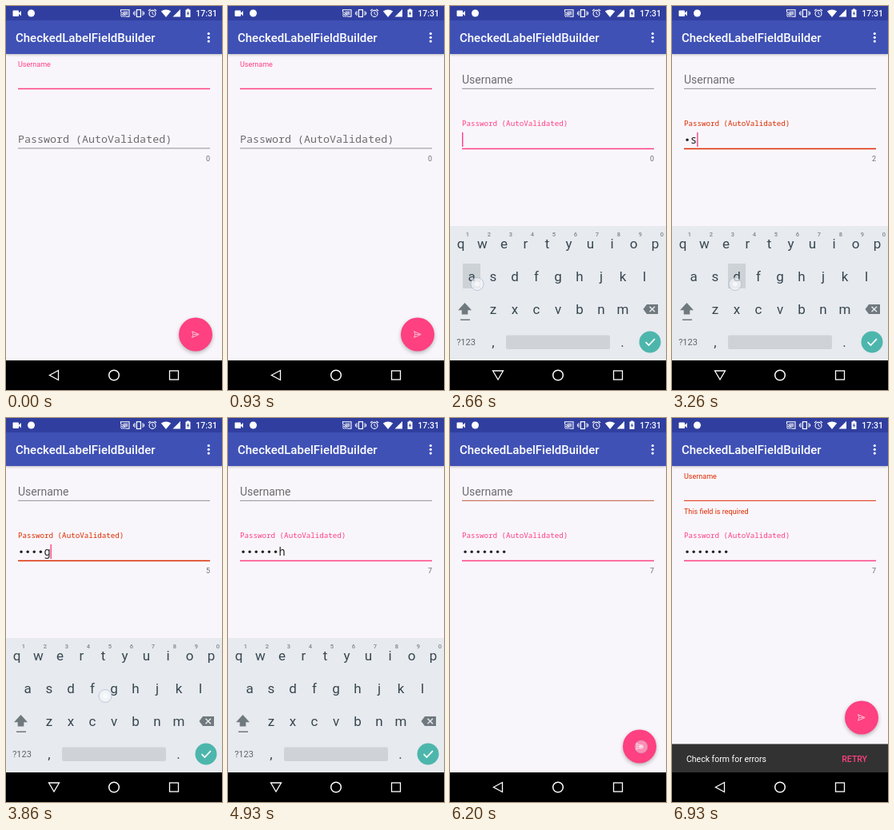
Animation of 270 by 480 pixels, one loop 7120 ms. Source, as an HTML page with a canvas:

```html
<!DOCTYPE html>
<html lang="en">
<head>
<meta charset="utf-8">
<title>Form validation</title>
<style>
  html, body { margin: 0; width: 100%; height: 100%; overflow: hidden; background: #000; }
  canvas { display: block; width: 270px; height: 480px; }
</style>
</head>
<body>
<canvas id="stage"></canvas>
<script>
const LOOP = 7120;
const SANS = 'Roboto, sans-serif';
const MONO = '"Noto Sans Mono", monospace';
const PINK = [255, 64, 129], RED = [221, 44, 0], GREY = [110, 108, 112], RULE = [146, 144, 147];
const ADVANCE = 8.1;
const NAV_TOP = 443;
const BLINKS = [[400, 930], [1330, 1860], [2330, 4930], [5430, 5930], [6430, 6930]];
const KEY_ROWS = [['qwertyuiop', 13.5, 297], ['asdfghjkl', 27, 338], ['zxcvbnm', 54, 379]];
// [press time, key, key centre]
const TAPS = [[2660, 'a', 27], [2900, 's', 54], [3180, 'd', 81], [3460, 'f', 108],
  [3730, 'g', 135], [4040, 'h', 162], [4300, 'h', 162]];
const HOLD = 130;

const canvas = document.getElementById('stage');
const ctx = canvas.getContext('2d');
const dpr = window.devicePixelRatio || 1;
canvas.width = 270 * dpr;
canvas.height = 480 * dpr;

const clamp = x => Math.min(1, Math.max(0, x));
const ramp = (t, from, ms) => clamp((t - from) / ms);
const lerp = (a, b, k) => a + (b - a) * k;
const mix = (a, b, k) => a.map((v, i) => Math.round(lerp(v, b[i], k)));
const rgb = c => `rgb(${c.join()})`;
const easeOut = (x, n = 2) => 1 - Math.pow(1 - x, n);
const easeInOut = x => x * x * (3 - 2 * x);

function rect(x, y, w, h, color) {
  ctx.fillStyle = color;
  ctx.fillRect(x, y, w, h);
}

function disc(x, y, r, color) {
  ctx.fillStyle = color;
  ctx.beginPath();
  ctx.arc(x, y, r, 0, Math.PI * 2);
  ctx.fill();
}

function ring(x, y, r, color, width = 1.2, from = 0, to = Math.PI * 2) {
  ctx.strokeStyle = color;
  ctx.lineWidth = width;
  ctx.beginPath();
  ctx.arc(x, y, r, from, to);
  ctx.stroke();
}

function poly(points, fill, stroke, width = 1.2) {
  ctx.beginPath();
  points.forEach(([x, y], i) => i ? ctx.lineTo(x, y) : ctx.moveTo(x, y));
  ctx.closePath();
  if (fill) { ctx.fillStyle = fill; ctx.fill(); }
  if (stroke) { ctx.strokeStyle = stroke; ctx.lineWidth = width; ctx.stroke(); }
}

function line(points, color, width) {
  ctx.strokeStyle = color;
  ctx.lineWidth = width;
  ctx.beginPath();
  points.forEach(([x, y], i) => i ? ctx.lineTo(x, y) : ctx.moveTo(x, y));
  ctx.stroke();
}

function rounded(x, y, w, h, r, color) {
  ctx.fillStyle = color;
  ctx.beginPath();
  ctx.roundRect(x, y, w, h, r);
  ctx.fill();
}

function text(str, x, y, size, color, { font = SANS, weight = 400, align = 'left' } = {}) {
  ctx.font = `${weight} ${size}px ${font}`;
  ctx.textAlign = align;
  ctx.fillStyle = color;
  ctx.fillText(str, x, y);
}

function withAlpha(alpha, draw) {
  ctx.save();
  ctx.globalAlpha *= alpha;
  draw();
  ctx.restore();
}

function withShadow(color, blur, dy, draw) {
  ctx.save();
  ctx.shadowColor = color;
  ctx.shadowBlur = blur * dpr;
  ctx.shadowOffsetY = dy * dpr;
  draw();
  ctx.restore();
}

function drawBars() {
  withShadow('rgba(0,0,0,.25)', 3, 1, () => rect(0, 18, 270, 42, '#3f51b5'));
  rect(0, 0, 270, 18, '#303f9f');
  text('CheckedLabelFieldBuilder', 12, 45, 15, '#fff', { weight: 500 });
  for (const y of [34.5, 39.3, 44.1]) disc(253.3, y, 1.6, '#fff');
  drawStatusIcons();
}

function drawStatusIcons() {
  const white = '#fff';
  rounded(8.5, 5.5, 7.5, 7.5, 1, white);
  poly([[15.5, 9.2], [18.8, 6], [18.8, 12.6]], white);
  disc(31.5, 9, 4.5, white);

  line([[143.5, 7], [143.5, 4.8], [154, 4.8], [154, 13.2], [150, 13.2]], white, 1.1);
  for (const r of [2, 4, 6]) ring(143, 13.8, r, white, 1, -Math.PI / 2, 0);
  rect(146.5, 6.5, 5.8, 4.8, 'rgba(255,255,255,.6)');

  ctx.strokeStyle = white;
  ctx.lineWidth = 1.2;
  ctx.strokeRect(163.4, 4.7, 5, 8.8);
  for (const x of [161, 171]) line([[x, 6.2], [x, 12]], white, 1);
  for (const x of [159.4, 172.6]) line([[x, 7.5], [x, 10.7]], white, 1);

  ring(183, 9.4, 4, white, 1.1);
  line([[183, 7], [183, 9.7], [184.8, 10.7]], white, 0.9);
  line([[178, 6], [180.6, 3.9]], white, 1.1);
  line([[188, 6], [185.4, 3.9]], white, 1.1);

  ctx.fillStyle = white;
  ctx.beginPath();
  ctx.moveTo(200, 14);
  ctx.lineTo(193.8, 6.6);
  ctx.quadraticCurveTo(200, 2.2, 206.2, 6.6);
  ctx.fill();
  poly([[208.5, 13.6], [218, 13.6], [218, 4]], white);

  rounded(224.5, 4.6, 6, 9.4, 0.6, white);
  rect(226.2, 3.5, 2.6, 1.4, white);
  poly([[228, 6], [225.9, 9.7], [227.3, 9.7], [227, 12.6], [229.2, 8.8], [227.8, 8.8]], '#303f9f');
  text('17:31', 264, 13, 10.5, white, { weight: 500, align: 'right' });
}

function cursor(t, x, y) {
  if (BLINKS.some(([a, b]) => t >= a && t < b)) rect(x, y, 1.4, 18, rgb(PINK));
}

function drawUsername(t) {
  const focused = t < 1330;
  const down = ramp(t, 1330, 200);
  const up = easeInOut(ramp(t, 6210, 200));
  const error = ramp(t, 6140, 110);
  const rested = t < 6200;
  const size = rested ? lerp(9, 14, Math.pow(down, 1.6)) : lerp(14, 9, up);
  const y = rested ? lerp(75.5, 96.6, easeOut(down, 2.2)) : lerp(96.6, 75.5, up);
  const color = rested ? mix(PINK, GREY, ramp(t, 1330, 120)) : mix(GREY, RED, up);
  text('Username', 15, y, size, rgb(color));
  if (focused) {
    rect(15, 102.7, 240, 1.5, rgb(PINK));
    cursor(t, 15, 83);
  } else {
    rect(15, 102.8, 240, 1, rgb(mix(RULE, RED, error)));
  }
  withAlpha(ramp(t, 6260, 200), () => text('This field is required', 15, 119.5, 9, rgb(RED)));
}

function drawPassword(t) {
  const count = TAPS.filter(([at]) => t >= at + HOLD).length;
  const focused = t >= 1330;
  const k = ramp(t, 1330, 200);
  const accent = count > 0 && count < 6 ? RED : PINK;
  const size = lerp(13.35, 9.2, easeOut(k, 1.5));
  const y = lerp(171.3, 150.2, Math.pow(k, 3.7));
  const color = mix(GREY, accent, Math.pow(k, 1.5));
  text('Password (AutoValidated)', 15, y, size, rgb(color), { font: MONO });

  if (focused) rect(15, 177.7, 240, 1.5, rgb(accent));
  else rect(15, 177.4, 240, 1, rgb(RULE));
  text(String(count), 255, 194, 9, rgb(GREY), { align: 'right' });

  const revealed = count > 0 && t < 5930;
  const dots = revealed ? count - 1 : count;
  for (let i = 0; i < dots; i++) disc(15 + (i + 0.5) * ADVANCE, 167.3, 1.7, '#222');
  if (revealed) text(TAPS[count - 1][1], 15 + dots * ADVANCE, 172.3, 13.5, '#222', { font: MONO });
  if (focused) cursor(t, 15 + count * ADVANCE, 158);
}

function drawFab(rise) {
  const y = 410.5 - rise;
  const ink = '#f8c4d5';
  withShadow('rgba(0,0,0,.28)', 5, 2, () => disc(237, y, 21, rgb(PINK)));
  poly([[232.6, y - 3.8], [241.2, y], [232.6, y + 3.8], [234, y]], null, ink, 1);
  line([[234, y], [239, y]], ink, 0.9);
}

function drawSnackbar(t, k) {
  if (!k) return;
  ctx.save();
  ctx.translate(0, 36.5 * (1 - k));
  rect(0, 407.5, 270, 37, '#323232');
  withAlpha(ramp(t, 6330, 180), () => {
    text('Check form for errors', 18, 429.5, 10.5, '#fff');
    text('RETRY', 244, 429.5, 10.5, rgb(PINK), { weight: 500, align: 'right' });
  });
  ctx.restore();
}

function drawKeyboard(t) {
  const ink = '#37474f', soft = '#7d878c', back = '#e7eaef';
  const center = { align: 'center' };
  rect(0, 275, 270, NAV_TOP - 275, back);
  const pressed = TAPS.find(([at]) => t >= at && t < at + HOLD - 20);
  if (pressed) rect(pressed[2] - 11, 322, 22, 31, '#cdd2d6');

  for (const [keys, x, y] of KEY_ROWS) {
    [...keys].forEach((key, i) => text(key, x + i * 27, y + 5.5, 17, ink, center));
  }
  for (let i = 0; i < 10; i++) text(String((i + 1) % 10), 22 + i * 27, 288, 7.5, soft, { align: 'center', weight: 500 });

  poly([[18.5, 371], [27, 380.3], [22.3, 380.3], [22.3, 385.5], [14.7, 385.5], [14.7, 380.3], [10, 380.3]], '#6f797e');
  rect(13, 391.5, 12, 1.5, '#6f797e');
  poly([[241.5, 379], [246, 373], [260, 373], [260, 385], [246, 385]], '#6f797e');
  line([[249.5, 375.8], [256, 382.2]], back, 1.5);
  line([[256, 375.8], [249.5, 382.2]], back, 1.5);

  text('?123', 20, 424, 11, '#5d686e', center);
  text(',', 54, 425.5, 17, ink, center);
  text('.', 215.5, 425.5, 17, ink, center);
  rounded(70, 411.5, 130, 17.5, 2, '#cfd3d7');
  disc(250, 420, 13.5, '#4db6ac');
  line([[244.6, 420.2], [248.4, 424], [256, 416.2]], '#fff', 1.7);
}

function drawNavIcons(keyboardOpen) {
  const back = keyboardOpen
    ? [[53.5, 456], [66.5, 456], [60, 467]]
    : [[54.4, 461.5], [65.5, 455.5], [65.5, 467.5]];
  poly(back, null, '#fff', 1.3);
  ring(135, 461.5, 6.3, '#fff', 1.5);
  ctx.strokeStyle = '#fff';
  ctx.lineWidth = 1.3;
  ctx.strokeRect(204.5, 456, 11, 11);
}

function drawTouch(t, start, hold, x, y) {
  if (t < start) return;
  const alpha = 1 - ramp(t, start + hold, 60);
  if (!alpha) return;
  withAlpha(alpha, () => {
    disc(x, y, 8, 'rgba(245,248,252,.65)');
    ring(x, y, 8, 'rgba(150,165,190,.6)', 0.9);
    disc(x, y, 3, 'rgba(255,255,255,.6)');
  });
}

function drawNav(t) {
  const shown = easeOut(ramp(t, 1370, 207));
  const hidden = Math.pow(ramp(t, 5550, 170), 2);
  const alpha = shown - hidden;
  rect(0, NAV_TOP, 270, 480 - NAV_TOP, '#000');
  if (alpha > 0) {
    withAlpha(alpha, () => {
      ctx.translate(0, 58 * (1 - alpha));
      drawKeyboard(t);
    });
  }
  const ripple = ramp(t, 5330, 200) * (1 - ramp(t, 5530, 350));
  if (ripple > 0) {
    withAlpha(0.25 * ripple, () => rounded(38, NAV_TOP, 46, 37, 18, '#fff'));
  }
  drawNavIcons(t >= 1400 && t < 5550);
}

function draw(t) {
  ctx.setTransform(dpr, 0, 0, dpr, 0, 0);
  const snack = easeInOut(ramp(t, 6260, 280));
  rect(0, 0, 270, 480, '#f9f6fb');
  drawUsername(t);
  drawPassword(t);
  drawFab(36 * snack);
  drawSnackbar(t, snack);
  drawBars();
  drawNav(t);

  drawTouch(t, 1330, 50, 90, 168);
  TAPS.forEach(([at, , x], i) => drawTouch(t, at, HOLD, x + Math.max(-11, 7 - 4.5 * i), 347.5));
  drawTouch(t, 5330, 140, 60, 462);
  drawTouch(t, 6130, 50, 239, 411);
}

const start = performance.now();
function tick() {
  draw((performance.now() - start) % LOOP);
  requestAnimationFrame(tick);
}
tick();
</script>
</body>
</html>
```
